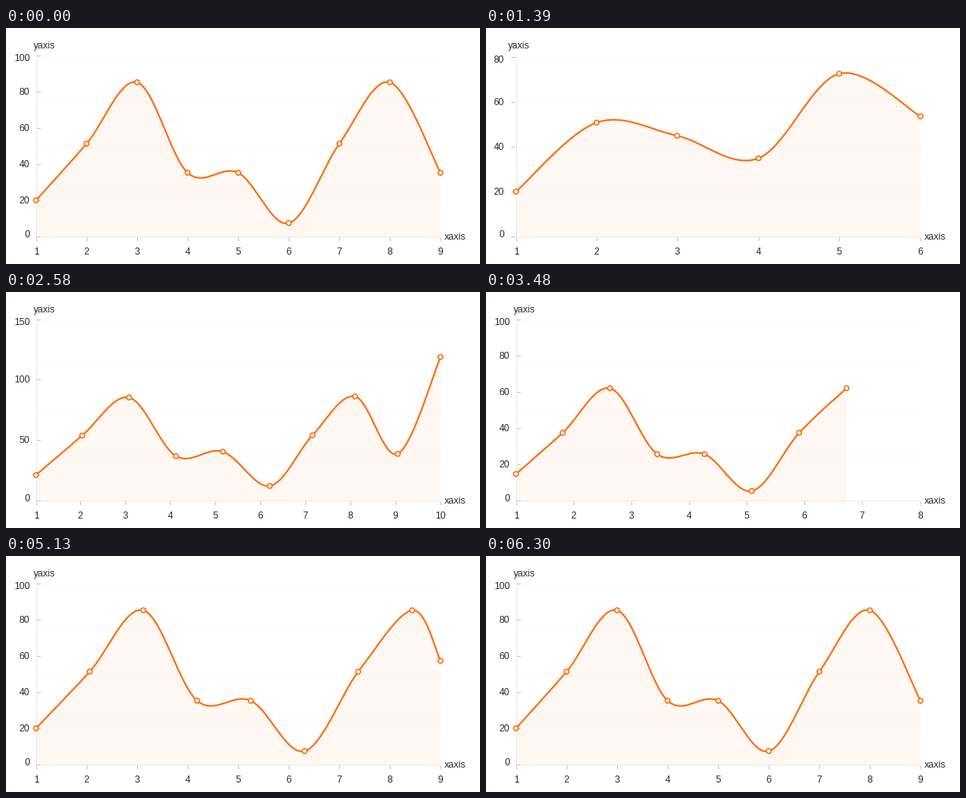
Write a matplotlib script that moves like this. It is 600 px wide and 300 px high and loops after 8000 ms.

```python
import numpy as np
import matplotlib.pyplot as plt
from matplotlib.animation import FuncAnimation
from matplotlib.patches import Circle

W, H, DPI = 600, 300, 100
LOOP, INTERVAL = 8000, 20
PX = 72 / DPI
LEFT, SPAN, BASE = 38, 512, 265
ORANGE, INK, AXIS, TICK = "#ff6600", "#2b2b2b", "#eaeaea", "#c4c4c4"
GROW_MS = 1500

SERIES = [20, 51, 85, 35, 35, 7, 51, 85, 35, 120]
# start ms, values, axis maximum, axis step, plot height, label shift
STAGES = [
    (385, [20, 51, 45, 35, 73, 54], 80, 20, 228, -7),
    (1911, SERIES, 150, 50, 230, 0),
    (3422, SERIES[:8], 100, 20, 230, 0),
    (4904, SERIES[:9], 100, 20, 230, 0),
]
# The chart is repainted in coarse steps of about 150 ms
STEPS = np.r_[0, 500:1401:150, 1540:1841:150, 1980:5131:150,
              5270, 5420, 5560, 5710, 5850:6301:150]

plt.rcParams["font.family"] = "Liberation Sans"
fig = plt.figure(figsize=(W / DPI, H / DPI), dpi=DPI, facecolor="white")
ax = fig.add_axes([0, 0, 1, 1])
ax.set_xlim(0, W)
ax.set_ylim(H, 0)
ax.axis("off")


def rule(xs, ys, color, z=3):
    return ax.plot(xs, ys, color=color, lw=PX, zorder=z, snap=False,
                   solid_capstyle="butt")[0]


def label(x, y, s, ha="left"):
    return ax.text(x, y, s, ha=ha, va="baseline", color=INK, fontsize=12 * PX)


def layout(values, top, height):
    """Whole-pixel positions of the data points."""
    x = LEFT + SPAN * np.arange(len(values)) / (len(values) - 1)
    y = BASE - np.array(values) * height / top
    return np.floor(np.column_stack([x, y]) + 1e-6)


def build_axes(values, top, step, height, shift):
    parts = [label(35 + shift, 26, "yaxis")]
    for v in range(0, top + 1, step):
        y = np.floor(BASE - v * height / top + 1e-6)
        base = y + (7 if v == top else 1.5 if v == 0 else 4)
        parts.append(label(30 + shift, base, str(v), "right"))
        parts.append(rule([39 + shift, 44 + shift], [y + 0.5] * 2, TICK))
    for i, x in enumerate(layout(values, top, height)[:, 0]):
        parts.append(label(x, 288, str(i + 1), "center"))
        parts.append(rule([x + 0.5] * 2, [266, 271], TICK))
    return parts


def smooth(p, n=24):
    """Catmull-Rom spline through the points, ends clamped."""
    q = np.vstack([p[:1], p, p[-1:]])
    t = np.linspace(0, 1, n, endpoint=False)[:, None]
    out = []
    for a, b, c, d in zip(q, q[1:], q[2:], q[3:]):
        v0, v1 = (c - a) / 2, (d - b) / 2
        out.append((2 * (b - c) + v0 + v1) * t**3
                   + (3 * (c - b) - 2 * v0 - v1) * t**2 + v0 * t + b)
    return np.vstack(out + [p[-1:]])


def quint_out(u):
    return 1 - (1 - min(max(u, 0), 1)) ** 5


ends = [layout(vals, top, h) for _, vals, top, _, h, _ in STAGES]
first = ends[0].copy()
first[:, 1] = first[0, 1]
begins = [first]
for prev, cur in zip(ends, ends[1:]):
    extra = max(len(cur) - len(prev), 0)
    padded = np.vstack([prev, np.repeat(prev[-1:], extra, axis=0)])
    begins.append(padded[:len(cur)])

for y in (37, 94, 151, 208):
    rule([LEFT, LEFT + SPAN], [y + 0.5] * 2, "#fbfbfb", 1)
rule([LEFT + 0.5] * 2, [36, 266], AXIS)
rule([LEFT, LEFT + SPAN], [BASE + 0.5] * 2, AXIS)
label(555, 269, "xaxis")
axes_parts = [build_axes(*stage[1:]) for stage in STAGES]

area, = ax.fill([0, 1, 1], [0, 0, 1], color=ORANGE, alpha=0.05, lw=0,
                zorder=2, snap=False)
line, = ax.plot([], [], color=ORANGE, lw=2 * PX, zorder=4, snap=False,
                solid_joinstyle="round")
nodes = [ax.add_patch(Circle((0, 0), 3, fc="white", ec=ORANGE, lw=1.5 * PX,
                             zorder=5, snap=False)) for _ in SERIES]


def update(frame):
    now = STEPS[STEPS <= frame * INTERVAL + 10][-1]
    k, u = len(STAGES) - 1, 1
    for i, stage in enumerate(STAGES):
        if now >= stage[0]:
            k, u = i, (now - stage[0]) / GROW_MS
    pts = begins[k] + (ends[k] - begins[k]) * quint_out(u)
    curve = smooth(pts)
    line.set_data(curve[:, 0], curve[:, 1])
    area.set_xy(np.vstack([curve, [pts[-1, 0], BASE], [LEFT, BASE]]))
    for i, node in enumerate(nodes):
        node.set_visible(i < len(pts))
        if i < len(pts):
            node.center = tuple(pts[i])
    for i, parts in enumerate(axes_parts):
        for part in parts:
            part.set_visible(i == k)
    return [area, line, *nodes]


anim = FuncAnimation(fig, update, frames=LOOP // INTERVAL, interval=INTERVAL,
                     repeat=True, repeat_delay=0, blit=False)
plt.show()
```
